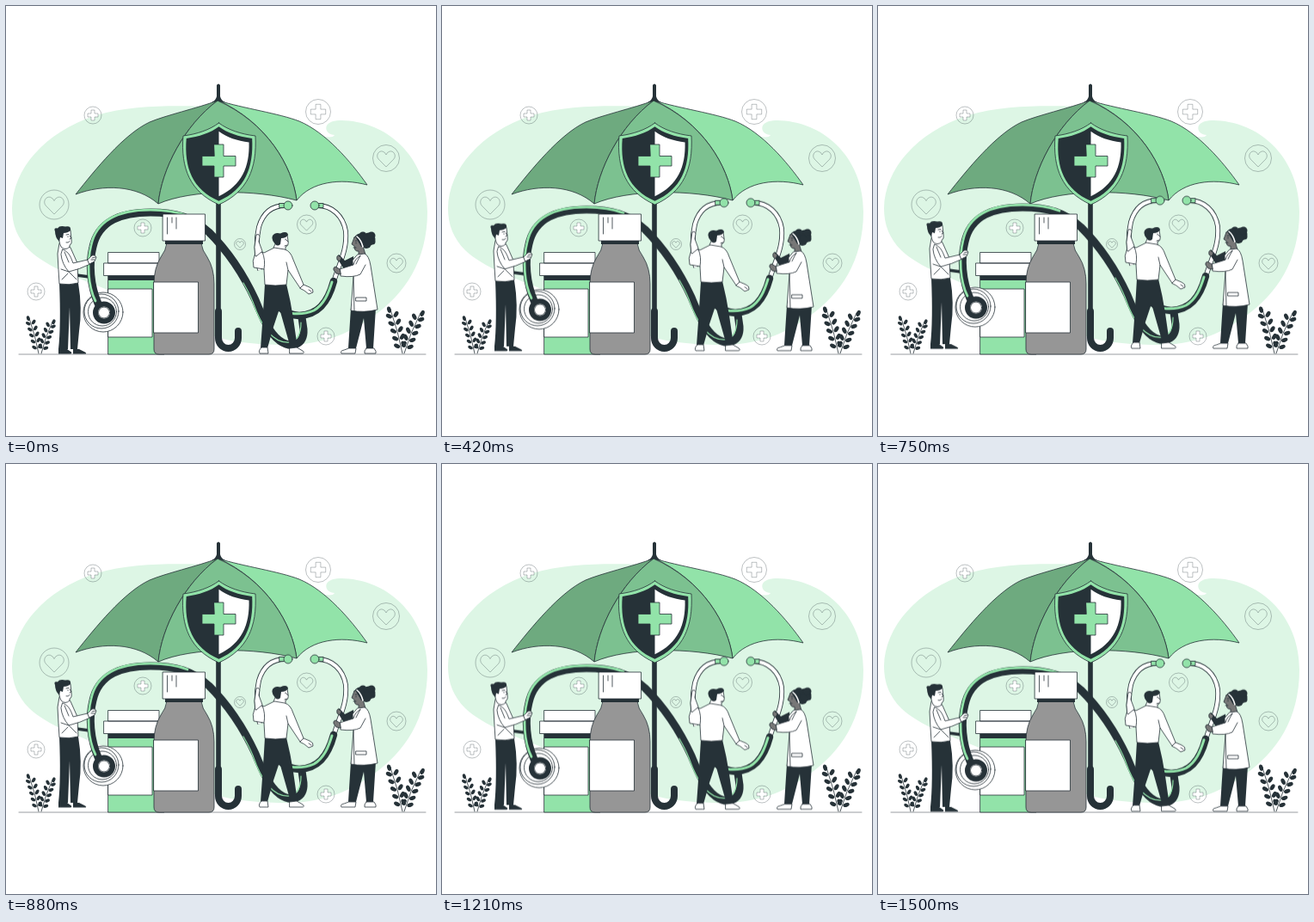
Write an HTML page that moves like this. It is 500 px wide and 500 px high and loops after 1.54 s.

```html
<!DOCTYPE html>
<html lang="en">
<head>
<meta charset="utf-8">
<title>Health cover</title>
<style>
html, body { margin: 0; width: 100%; height: 100%; overflow: hidden; background: #fff; }
svg { display: block; width: 100vw; height: 100vh; }
.float { animation: float 1540ms linear infinite; }
@keyframes float { 50% { transform: translateY(-6px); } }
.ink { fill: #263238; }
.w, .g, .o { stroke: #263238; stroke-width: .8; stroke-linejoin: round; stroke-linecap: round; }
.w { fill: #fff; }
.g { fill: #92e3a9; }
.o { fill: none; }
.shade { fill: #6eaa7f; }
.mid { fill: #7cc190; }
.glass { fill: #969696; }
.skin { fill: #777; }
.icon { fill: none; stroke: #263238; stroke-opacity: .38; stroke-width: .8; vector-effect: non-scaling-stroke; }
.plus { fill: #fff; }
.tube { fill: none; stroke: #263238; stroke-linecap: round; }
.shine { fill: none; stroke: #92e3a9; stroke-linecap: round; }
.rod { fill: none; stroke: #fff; stroke-width: 4.2; }
.edge { fill: none; stroke: #263238; stroke-width: 5.8; }
</style>
</head>
<body>
<svg viewBox="0 0 500 500">
  <defs>
    <g id="plus">
      <circle class="icon" r="10"/>
      <path class="icon plus" d="M-2-6H2V-2H6V2H2V6H-2V2H-6V-2H-2Z"/>
    </g>
    <g id="heart">
      <circle class="icon" r="10"/>
      <path class="icon" d="M0 6.5L-5.6 .8C-8.2-2-5.5-6-2.6-5.1Q-.7-4.5 0-2.6Q.7-4.5 2.6-5.1C5.5-6 8.2-2 5.6 .8Z"/>
    </g>
    <path id="mainTube" d="M107 346C98 325 96 300 101 280C108 249 135 240 168 240C198 240 217 246 236 263C261 288 278 316 290 342C298 362 306 380 318 389C332 399 347 394 346 376L344 362"/>
    <path id="yoke" d="M306 330C313 349 324 359 341 360C362 359 374 346 381 320"/>
    <path id="rodL" d="M325 232C309 232 299 240 294 257C291 270 290 285 295 307"/>
    <path id="rodR" d="M362 232C379 232 392 244 395 262C397 284 387 300 381 321"/>
    <path id="crest" d="M247.500 136C237 144 222 149 206 151C203 189 214 216 247.500 231C281 216 292 189 290 151C273 149 258 144 247.500 136Z"/>
  </defs>

  <path fill="#ddf6e5" d="M7 235C8 190 44 147 105 127C150 114 200 116 246 117C300 119 335 137 352 145C364 150 378 156 382 150C373 149 371 143 373 139C377 132 393 132 408 135C452 143 490 182 490 239C490 297 463 335 428 360C396 384 362 395 318 394C250 392 228 384 188 350C159 340 138 338 118 330C86 317 48 304 27 284C13 270 7 254 7 235Z"/>
  <g id="icons"></g>
  <path class="o" d="M15 405H488" stroke-opacity=".6"/>
  <g id="plants" class="ink"></g>

  <!-- umbrella -->
  <path class="tube" stroke-width="5.6" d="M247 220V356"/>
  <path class="tube" stroke-width="8" d="M247 355V386A11.5 12 0 0 0 270 386V378"/>
  <path class="ink" d="M245 92Q247 89 249 92L249 105Q250 110 255 112H239Q244 110 245 105Z"/>
  <path class="o shade" d="M246 110C222 119 186 127 167 135C137 149 104 190 81 219C113 207 152 208 177 230C181 190 207 139 246 110Z"/>
  <path class="g" d="M247 110C276 119 318 125 341 134C372 147 401 181 420 208C389 200 355 204 338 226C333 186 303 135 247 110Z"/>
  <path class="o mid" d="M246 110C207 139 181 190 177 230C216 213 290 213 338 226C333 186 303 135 246 110Z"/>

  <!-- shield -->
  <use href="#crest" class="g"/>
  <g transform="translate(247.500 183) scale(.91) translate(-247.500 -183)">
    <use href="#crest" class="ink"/>
    <path fill="#fff" d="M247.500 142C258 150 271 154 286 156C287 187 277 211 247.500 225Z"/>
  </g>
  <path class="g" d="M242 161H253V174.500H267V186H253V199H242V186H228V174.500H242Z"/>

  <!-- jar -->
  <path class="w" d="M119 286.500H178V299H119ZM114 299H184V313.500H114Z"/>
  <path class="g" d="M119 314H184V405H119Z"/>
  <path class="ink" d="M119 314H184V319H119Z"/>
  <path class="w" d="M119 329H170V385H119Z"/>

  <!-- stethoscope -->
  <g class="float">
    <use href="#rodL" class="edge"/><use href="#rodL" class="rod"/>
    <use href="#rodR" class="edge"/><use href="#rodR" class="rod"/>
    <path class="g" d="M318 229.500H325V234.500H318ZM362 229.500H369V234.500H362Z"/>
    <circle class="g" cx="328" cy="232" r="5"/>
    <circle class="g" cx="359" cy="232" r="5"/>
    <circle class="w" cx="113" cy="356" r="23"/>
    <circle class="w" cx="111" cy="355" r="20"/>
    <circle class="o" cx="112" cy="355.500" r="16.500"/>
    <path class="tube" stroke-width="3.500" d="M82 313L97 315"/>
    <use href="#mainTube" class="tube" stroke-width="9"/>
    <path class="shine" stroke-width="2.800" d="M104 343C95 325 94 298 99 278C106 246 135 237.200 168 237.200C184 237.200 198 239 211 244"/>
    <path class="shine" stroke-width="1.200" d="M276 322Q283 334 287 344C297 373 310 393 330 391Q343 388 343 368"/>
    <use href="#yoke" class="tube" stroke-width="8.500"/>
    <path class="shine" stroke-width="3" d="M332 357.500Q347 359 358 354C370 347 375 334 379 321"/>
    <circle cx="114" cy="356.500" r="10" fill="#fff" stroke="#263238" stroke-width="6"/>
    <circle class="w" cx="114" cy="356.500" r="6.500"/>
  </g>

  <!-- bottle -->
  <path class="o glass" d="M187 276H227Q228 284 234 292Q242 305 242 323V399Q242 405 236 405H178Q172 405 172 399V323Q172 305 180 292Q186 284 187 276Z"/>
  <path class="ink" d="M185 272H229V277H185Z"/>
  <path class="w" d="M182.500 242H231.500V273H182.500Z"/>
  <path class="o" d="M187.500 246V265M193 246V252M198 246V259"/>
  <path class="w" d="M172 321H223.500V380H172Z"/>

  <!-- man at the left -->
  <g class="float">
    <path class="ink" d="M62 322H84Q89 352 85 378L83 399H75L74 350L72 399H61Q64 372 62 322Z"/>
    <path class="ink" d="M61 399H71L76 402.500Q77 404.500 74 404.500H61ZM78 399H85L92 402.500Q95 404.500 91 404.500H78Z"/>
    <path class="w" d="M62 276L60 288Q61 308 62 323Q74 325 84 322L83 299L75 281Z"/>
    <path class="w" d="M61 263Q61 274 64 280Q69 285 74 280L74 278Q77 277 76 271L75 261Z"/>
    <path class="ink" d="M57 262Q55 257 60 258.500Q62 255 69 256.500Q76 255 75 261Q72 264 67 264L66 270L63 269L62 274Q57 269 57 262Z"/>
    <path class="o" d="M70 266L73 265.500M72 268V268.500M74 267L76 270L74 271M70 275Q73 276 74 273.500"/>
    <path class="w" d="M66 283C74 286 76 294 78 299L95 295L98 300Q86 306 73 309Q65 300 64 289Z"/>
    <path class="w" d="M95 295L100 290Q104 289 105 292L103 297L97 300Z"/>
    <path class="o" d="M100 293L104 292M99 295L103 295M68 286L73 298M64 306L73 309L82 318M65 318L72 311"/>
  </g>

  <!-- man in the middle -->
  <g class="float">
    <path class="ink" d="M301 323H326Q331 343 334 363L339 398H331L318 352L311 373L304 398H296Q299 358 301 323Z"/>
    <path class="w" d="M297 397H304L305 404H295Q293 401 297 397ZM330 398L338 397L345 401Q348 404 344 404H330Z"/>
    <path class="w" d="M289 280L291 266Q294 264 295 268L294 274L298 285L297 292L290 291Z"/>
    <path class="w" d="M315 269Q314 277 311 281Q317 286 325 284L325 280Q329 279 328 273L327 266Z"/>
    <path class="w" d="M289 290Q286 296 288 304L300 306L301 324Q313 326 326 324L328 307L342 328L346 324L334 295Q331 285 324 283L312 281Q306 284 300 287L297 286L291 291Z"/>
    <path class="w" d="M342 328L346 324L353 327Q358 329 357 333L352 335L347 331Z"/>
    <path class="o" d="M298 286Q302 295 300 306M328 307L326 298M352 330L355 332"/>
    <path class="ink" d="M310 267Q313 262.500 319 264.500Q327 261 328 266Q326 270 320 270L319 277Q316 280 313 277Q308 272 310 267Z"/>
    <path class="o" d="M325 271V272M324 279L327 278M326 272L328 274"/>
  </g>

  <!-- doctor -->
  <g class="float">
    <path class="ink" d="M401 351H430L427 398H419L416 363L407 398H398Z"/>
    <path class="w" d="M399 398H407L406 404H390Q388 401 393 400ZM419 398H428Q431 402 430 404H417Q416 401 419 398Z"/>
    <circle class="ink" cx="422" cy="271" r="7.500"/>
    <circle class="ink" cx="415" cy="267" r="4.500"/>
    <circle class="ink" cx="425" cy="267" r="4.500"/>
    <circle class="ink" cx="426" cy="274" r="3.500"/>
    <circle class="ink" cx="419" cy="276" r="6"/>
    <path class="ink" d="M387 289L394 296L404 291L405 302L393 306L385 293Z"/>
    <path class="o skin" d="M405 269L402 277L405 279Q405 286 410 285L410 291L418 289L415 279L413 268Q409 265 405 269Z"/>
    <path class="ink" d="M406 268Q409 263 415 265L418 279L413 280Z"/>
    <path class="o" style="stroke:#fff;stroke-width:1.600" d="M408 268Q413 272 415 280"/>
    <path class="o" d="M406 273H408M407 275V276M404 281L407 281"/>
    <path class="w" d="M409 289L417 288Q422 290 424 302L432 353Q416 357 401 354L404 315L403 296Z"/>
    <path class="w" d="M412 291Q406 293 404 301L388 306L389 314Q404 316 412 312L418 301"/>
    <path class="o skin" d="M388 306L383 303Q380 304 381 307L384 311L389 312ZM386 290Q384 291 385 295L388 297L390 293Z"/>
    <path class="o" d="M407 339H419V343H407ZM404 315L405 354M412 290L407 300"/>
  </g>
</svg>
<script>
const fill = (id, html) => document.getElementById(id).innerHTML = html;

const icon = kind => ([x, y, r]) =>
  `<use href="#${kind}" transform="translate(${x} ${y}) scale(${r / 10})"/>`;
const pluses = [[101, 127, 10], [363, 123, 14.5], [159, 258, 10], [35, 332, 10], [372, 384, 10]];
const hearts = [[56, 231, 17], [442, 177, 15.5], [349.5, 254, 11], [272, 277, 6.5], [454, 299, 11]];
fill('icons', pluses.map(icon('plus')).join('') + hearts.map(icon('heart')).join(''));

// A bent stem with paired leaves and one at the tip
function stem(x, y, dx, h, size) {
  const leaf = (px, py, turn) =>
    `<ellipse cx="${size * 1.5}" rx="${size}" ry="${size * .62}" transform="translate(${px} ${py}) rotate(${turn})"/>`;
  const lean = Math.atan2(-h, dx) * 180 / Math.PI;
  let out = `<path class="o" d="M${x} ${y}Q${x + dx * .35} ${y - h * .5} ${x + dx} ${y - h}"/>`;
  for (let i = 0; i < 5; i++) {
    const t = .12 + i * .17;
    const px = x + dx * (.7 * t + .3 * t * t), py = y - h * t;
    out += leaf(px, py, lean - 48) + leaf(px, py, lean + 48);
  }
  return out + leaf(x + dx, y - h + size * 1.5, lean);
}
fill('plants', stem(38, 404, -11, 41, 3) + stem(41, 404, 13, 37, 3) +
  stem(461, 404, -14, 51, 3.8) + stem(463, 404, 19, 47, 3.8));
</script>
</body>
</html>
```
